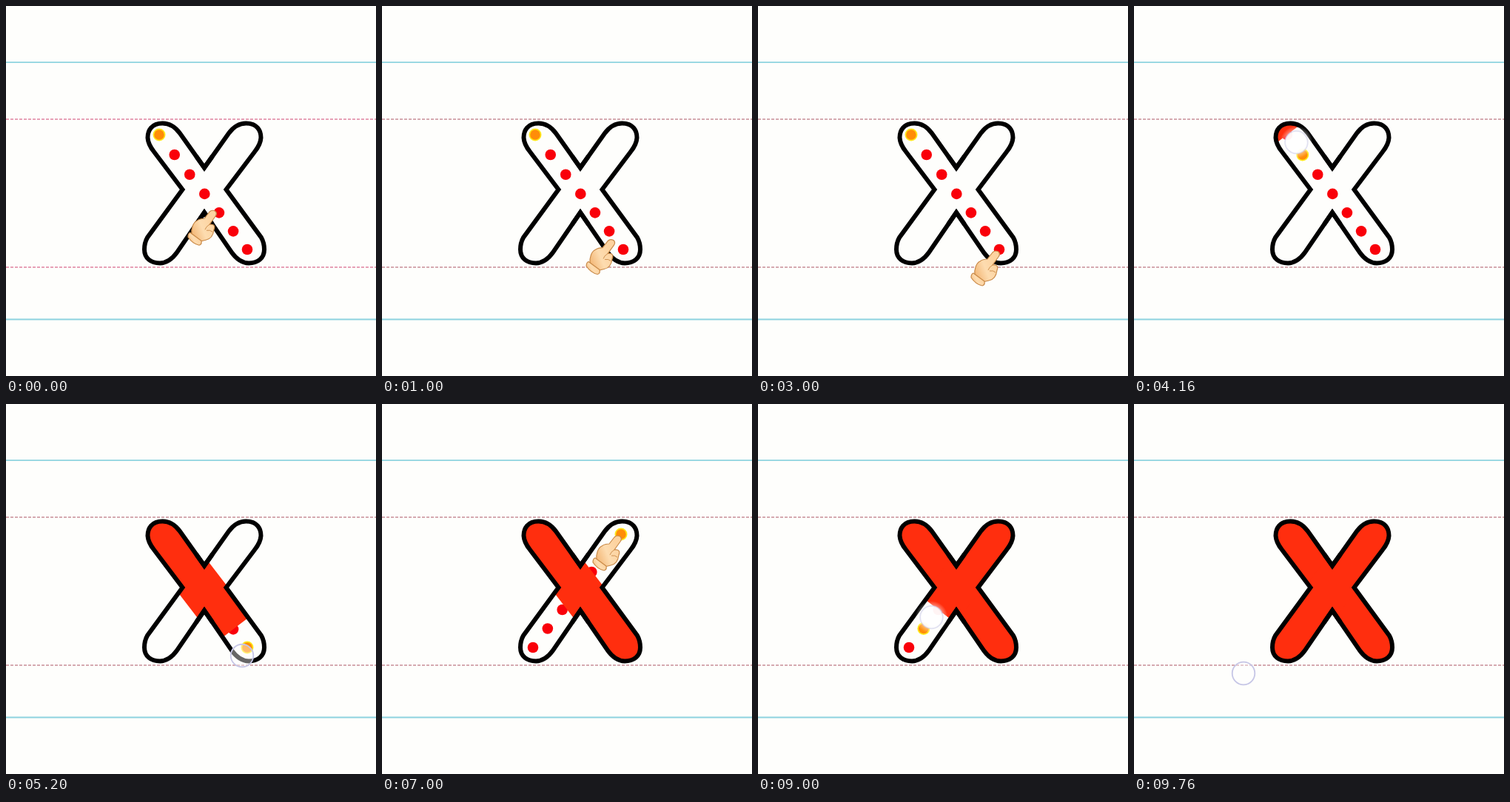
Recreate the animation shown at these times as an HTML page. Size 500 by 500 pixels, loop 9800 ms.

```html
<!DOCTYPE html>
<html lang="en">
<head>
<meta charset="utf-8">
<title>Tracing the letter x</title>
<style>
  html, body { margin: 0; width: 100%; height: 100%; overflow: hidden; background: #fefefc; }
  svg { display: block; width: 100vw; height: 100vh; }
</style>
</head>
<body>
<svg viewBox="0 0 500 500">
  <defs>
    <!-- Left half of the letter; its ends run on along the mirrored half. -->
    <path id="half" d="M279 203 L268 218.5 L235 172 Q225 158.5 211.5 158.5 C197 158.5 191.5 168 191.5 178
      Q192 187 200 197 L238.5 248 L191 313 Q187 320 187 329 C187 341 196 347.5 208 347.5
      Q221 347 231 333 L268 279 L279 295"/>
    <clipPath id="inside">
      <use href="#half"/>
      <use href="#half" transform="matrix(-1 0 0 1 536 0)"/>
    </clipPath>
    <radialGradient id="glow">
      <stop offset=".6" stop-color="#fff" stop-opacity=".8"/>
      <stop offset="1" stop-color="#fff" stop-opacity="0"/>
    </radialGradient>
    <linearGradient id="skin" x1="0" y1=".7" x2=".8" y2=".3">
      <stop offset="0" stop-color="#f3b878"/>
      <stop offset=".5" stop-color="#fddcb0"/>
      <stop offset="1" stop-color="#fdd3a0"/>
    </linearGradient>
  </defs>
  <rect width="500" height="500" fill="#fefefc"/>
  <path d="M0 76.2H500M0 423.5H500" stroke="#8ed3df" stroke-width="1.8"/>
  <path id="dashes" d="M0 153H500M0 353H500" stroke-width="1.4" stroke-dasharray="4 2"/>
  <g id="dots" fill="#f9000a"></g>
  <g id="fills" clip-path="url(#inside)" stroke="#ff2e0e" stroke-width="58"></g>
  <g id="goal">
    <circle r="8.5" fill="#ffe81a"/>
    <circle r="6.8" fill="#ff8d08"/>
  </g>
  <g fill="none" stroke="#000" stroke-width="6">
    <use href="#half"/>
    <use href="#half" transform="matrix(-1 0 0 1 536 0)"/>
  </g>
  <g id="hand" fill="url(#skin)" stroke="#c98a48" stroke-width="1.2" stroke-linejoin="round">
    <path d="M-3 -1 C2 -1 4 3 1 7 L-7 18 C-1 17 1 20 -1 25 C-2 33 -6 38 -12 39 L-20 41
      L-31 31 C-32 24 -29 15 -24 13 Q-20 10 -14 10 L-7 1 Q-5 -1 -3 -1Z"/>
    <path d="M-33 29 L-18 40 Q-17 45 -21 46 Q-30 44 -36 35 Q-36 30 -33 29Z"/>
    <path d="M-7 18 Q-12 21 -13 25 M-11 26 Q-6 25 -3 28" fill="none" stroke-width=".9"/>
  </g>
  <g id="cursor">
    <circle id="halo" r="22" fill="url(#glow)"/>
    <circle id="disc" r="15.3" stroke="#c6c6e6" stroke-width="1.8"/>
  </g>
</svg>
<script>
const LOOP = 9800;
const HAND_TIME = 5080;
const GAPS = 6;
const OVERHANG = 40;
const $ = id => document.getElementById(id);
const clamp = v => Math.max(0, Math.min(1, v));
const mix = (a, b, p) => a.map((v, i) => v + (b[i] - v) * p);
const easeInOut = p => p < .5 ? 2 * p * p : 1 - 2 * (1 - p) ** 2;

// Times in ms; finger lists where the cursor lands, lifts and rests.
const strokes = [
  { first: [207, 174], last: [326, 329], bow: 3, shown: 0, handShown: 0, handStart: 2136 - HAND_TIME,
    begin: 4000, end: 5200, leave: 600, finger: [[204, 160], [319, 340], [323, 382]] },
  { first: [323, 176], last: [204, 329], bow: 0, shown: 5450, handShown: 6000, handStart: 7000,
    begin: 8030, end: 9350, leave: 410, finger: [[322, 177], [203, 328], [148, 364]] }
];

function svgNode(tag, parent) {
  return parent.appendChild(document.createElementNS("http://www.w3.org/2000/svg", tag));
}

function setAttrs(node, attrs) {
  for (const key in attrs) node.setAttribute(key, attrs[key]);
}

function showAt(node, point) {
  node.style.display = point ? "" : "none";
  if (point) node.setAttribute("transform", `translate(${point})`);
}

for (const s of strokes) {
  s.length = Math.hypot(s.last[0] - s.first[0], s.last[1] - s.first[1]);
  s.at = d => mix(s.first, s.last, d / s.length);
  s.stops = Array.from({ length: GAPS + 1 },
    (_, i) => s.length * i / GAPS + s.bow * Math.sin(Math.PI * i / GAPS));
  s.group = svgNode("g", $("dots"));
  for (const d of s.stops) {
    const [cx, cy] = s.at(d);
    setAttrs(svgNode("circle", s.group), { cx, cy, r: 7.3 });
  }
  s.band = svgNode("line", $("fills"));
}

// The paint advances to each dot as the finger reaches it.
function paintFront(s, travelled) {
  return s.stops.reduce((front, d, i) => {
    const goal = i === GAPS ? s.length + OVERHANG : d;
    return front + (goal - front) * clamp((travelled - d) / 8);
  }, -OVERHANG);
}

function drawStroke(s, t) {
  const travelled = (t - s.begin) / (s.end - s.begin) * s.length - 4;
  const front = paintFront(s, travelled);
  const [x1, y1] = s.at(-OVERHANG), [x2, y2] = s.at(front);
  setAttrs(s.band, { x1, y1, x2, y2 });
  const active = t >= s.shown && front < s.length + OVERHANG;
  s.group.style.display = active ? "" : "none";
  const next = s.stops.find(d => d > travelled);
  return active && next !== undefined ? s.at(next) : null;
}

function handAt(s, t) {
  if (t < s.handShown || t >= s.begin - 100) return null;
  const [x, y] = s.at(s.length * easeInOut(clamp((t - s.handStart) / HAND_TIME)));
  return [x - 2, y + 3];
}

function drawCursor(s, t) {
  const [land, lift, rest] = s.finger;
  const traced = mix(land, lift, clamp((t - s.begin) / (s.end - s.begin)));
  const point = t < s.end ? traced : mix(lift, rest, clamp((t - s.end) / s.leave));
  const press = clamp((t - s.begin + 150) / 150) * clamp((s.end - t) / 100);
  const fadeIn = clamp((t - s.begin + 600) / 400);
  const fadeOut = clamp((t - s.end - s.leave) / 400);
  showAt($("cursor"), point);
  $("cursor").setAttribute("opacity", fadeIn * (1 - fadeOut));
  $("halo").setAttribute("opacity", press * .7);
  setAttrs($("disc"), { fill: `rgba(255,255,255,${.4 + .5 * press})`, "stroke-opacity": 1 - .5 * press });
}

function render(t) {
  $("dashes").setAttribute("stroke", t < 1000 ? "#df83a0" : "#c78e98");
  const goals = strokes.map(s => drawStroke(s, t));
  const hands = strokes.map(s => handAt(s, t));
  showAt($("goal"), goals[0] || goals[1]);
  showAt($("hand"), hands[0] || hands[1]);
  drawCursor(strokes[t < 6500 ? 0 : 1], t);
}

const started = performance.now();
function tick() {
  render((performance.now() - started) % LOOP);
  requestAnimationFrame(tick);
}
render(0);
requestAnimationFrame(tick);
</script>
</body>
</html>
```
